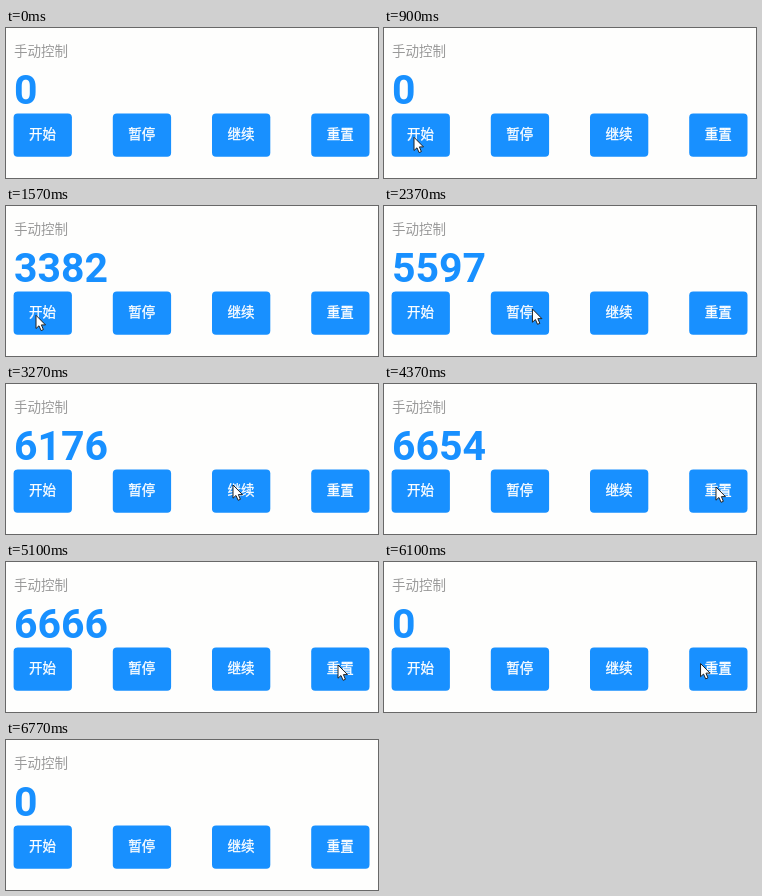
An HTML page that plays this animation: 372 by 150 pixels, repeating every 7670 ms.

```html
<!DOCTYPE html>
<html lang="zh-CN">
<head>
<meta charset="utf-8">
<title>手动控制</title>
<style>
  html, body { margin: 0; width: 100%; height: 100%; overflow: hidden; background: #fefefd; }
  svg { display: block; width: 372px; height: 150px; }
  text { font-family: "Noto Sans CJK SC", "Noto Sans CJK", sans-serif; font-size: 13.5px; }
  .label { fill: #999; }
  .count { font: 700 41px Roboto, sans-serif; fill: #1890ff; }
  .button rect { fill: #1890ff; }
  .button text { fill: #fff; stroke: #fff; stroke-width: .3; text-anchor: middle; }
</style>
</head>
<body>
<svg viewBox="0 0 372 150">
  <text class="label" x="8" y="27.8">手动控制</text>
  <text class="count" id="count" x="8" y="76">0</text>
  <g id="buttons"></g>
  <path id="cursor" d="M0 0V13.2L3 10.5L5.1 15.3L7.4 14.3L5.4 9.6H9.5Z"
        fill="#fff" stroke="#222" stroke-linejoin="round"/>
</svg>
<script>
const LOOP = 7670;
const TARGET = 6666;
const START = 1264, PAUSE = 2054, RESUME = 3034, RESET = 5770;
const DURATION = 3000, RESUMED_DURATION = 2100;

const easeOut = k => 1 - (1 - k) ** 3;
const easeInOut = k => k * k * (3 - 2 * k);
const easeOutExpo = k => k >= 1 ? 1 : (1 - 2 ** (-10 * k)) * 1024 / 1023;
const mix = (a, b, k) => a + (b - a) * k;
const progress = (time, start, span) => Math.min(1, Math.max(0, (time - start) / span));

// The pointer enters below the second button, visits each button, then leaves to the left.
const entry = { x: 122, y: 121 };
const moves = [
  { start: 770, span: 130, x: 30, y: 109.3, ease: easeOut },
  { start: 1580, span: 950, x: 149, y: 103, ease: easeOut },
  { start: 2370, span: 400, x: 227, y: 101, ease: easeOut },
  { start: 3290, span: 1150, x: 332, y: 103, ease: easeOut },
  { start: 6000, span: 765, x: 2, y: 72, ease: easeInOut }
];
const first = moves[0], last = moves[moves.length - 1];

const countEl = document.getElementById("count");
const cursorEl = document.getElementById("cursor");

document.getElementById("buttons").innerHTML = ["开始", "暂停", "继续", "重置"]
  .map((name, i) => `<g class="button" transform="translate(${7.6 + i * 99.2} 85.4)">
    <rect width="58.3" height="43.3" rx="4"/><text x="29" y="26.1">${name}</text></g>`)
  .join("");

// Resuming eases afresh from the paused value.
function countAt(time) {
  if (time >= RESET) return 0;
  const run = progress(Math.min(time, PAUSE), START, DURATION);
  const resumed = progress(time, RESUME, RESUMED_DURATION);
  return mix(TARGET * easeOutExpo(run), TARGET, easeOutExpo(resumed));
}

function cursorAt(time) {
  return moves.reduce((from, { start, span, x, y, ease }) => {
    const k = ease(progress(time, start, span));
    return { x: mix(from.x, x, k), y: mix(from.y, y, k) };
  }, entry);
}

function draw(time) {
  const { x, y } = cursorAt(time);
  const visible = time >= first.start && time < last.start + last.span;
  countEl.textContent = countAt(time).toFixed(0);
  cursorEl.setAttribute("visibility", visible ? "visible" : "hidden");
  cursorEl.setAttribute("transform", `translate(${x} ${y})`);
}

let origin;
function tick(now) {
  origin ??= now;
  draw((now - origin) % LOOP);
  requestAnimationFrame(tick);
}
draw(0);
requestAnimationFrame(tick);
</script>
</body>
</html>
```
